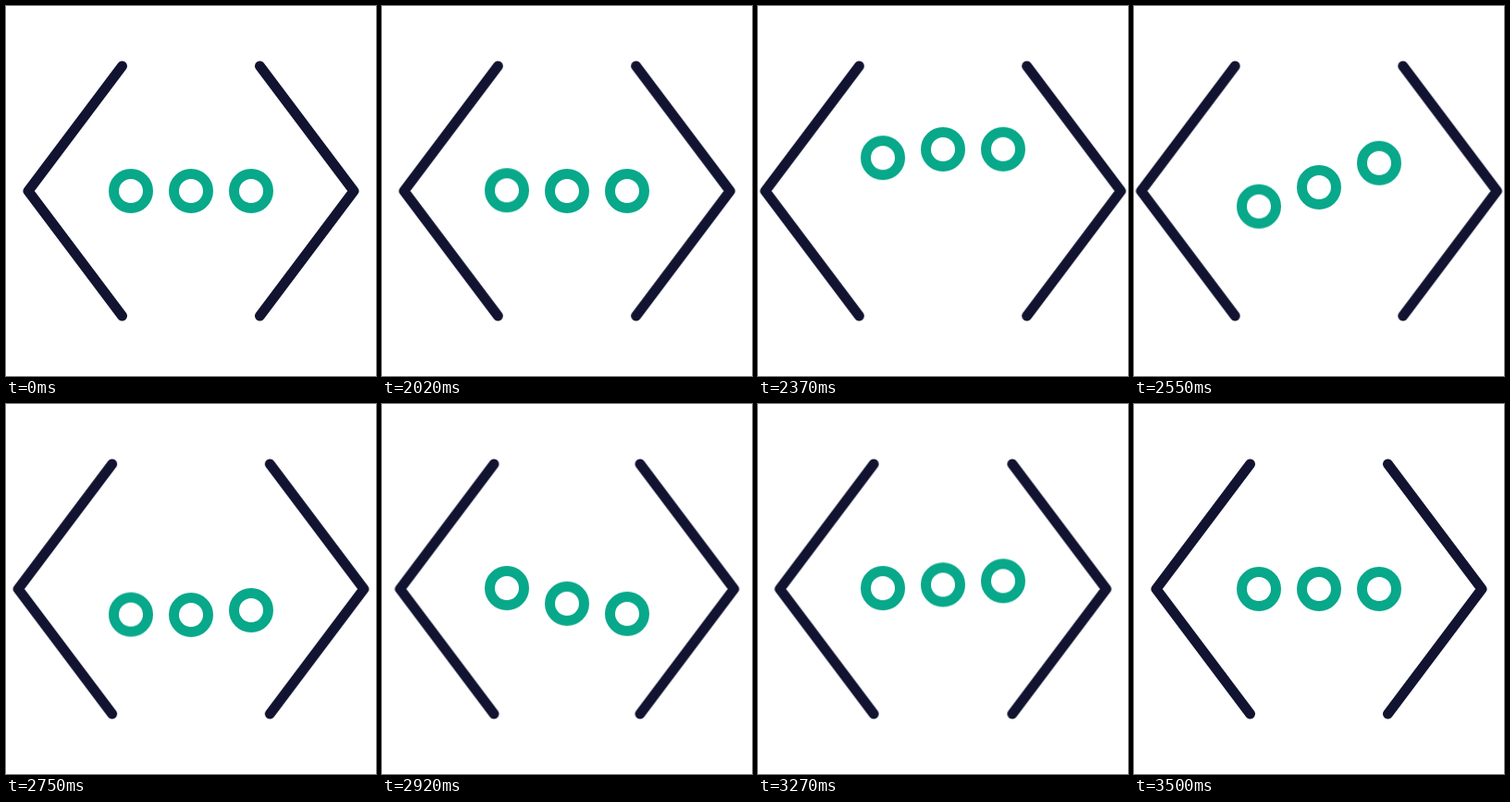
Animation of 400x400 px, one loop 3520 ms. Source, as an HTML page:

```html
<!DOCTYPE html>
<html lang="en">
<head>
<meta charset="utf-8">
<title>Code brackets</title>
<style>
  html, body { margin: 0; width: 100%; height: 100%; overflow: hidden; background: #fff; }
  svg { display: block; width: 100vw; height: 100vh; }
  g { fill: none; stroke-width: 11; stroke-linecap: round; stroke-linejoin: round; }
</style>
</head>
<body>
<svg viewBox="0 0 400 400">
  <g stroke="#121331">
    <path id="left" d="M125.5 65 24 200l101.5 135"/>
    <path id="right" d="M274.5 65 376 200 274.5 335"/>
  </g>
  <g stroke="#08a88a">
    <circle class="dot" cx="135" cy="200" r="18.5"/>
    <circle class="dot" cx="200" cy="200" r="18.5"/>
    <circle class="dot" cx="265" cy="200" r="18.5"/>
  </g>
</svg>
<script>
  const LOOP = 3520;
  const STAGGER = 78;

  // Steps: [time in ms, offset in px, easing towards the next step]
  const spread = [
    [2000, 0, 'cubic-bezier(.25,0,.3,1)'],
    [2460, 16.7, 'cubic-bezier(.4,0,.15,1)'],
    [3500, 0, 'linear']
  ];
  const bounce = [
    [2000, 0, 'cubic-bezier(.4,0,.39,1)'],
    [2250, -46.1, 'cubic-bezier(.49,0,.39,1)'],
    [2710, 28.4, 'cubic-bezier(.49,0,.39,1)'],
    [3061, -9.5, 'cubic-bezier(.4,0,.5,1)'],
    [3341, 0, 'linear']
  ];

  function play(el, steps, toTransform, delay = 0) {
    const rest = { transform: toTransform(0) };
    const frames = steps.map(([time, value, easing]) => ({
      offset: (time + delay) / LOOP,
      transform: toTransform(value),
      easing
    }));
    el.animate(
      [{ ...rest, offset: 0 }, ...frames, { ...rest, offset: 1 }],
      { duration: LOOP, iterations: Infinity }
    );
  }

  play(document.getElementById('left'), spread, v => `translate(${-v}px, 0px)`);
  play(document.getElementById('right'), spread, v => `translate(${v}px, 0px)`);
  document.querySelectorAll('.dot').forEach((dot, i) =>
    play(dot, bounce, v => `translate(0px, ${v}px)`, i * STAGGER));
</script>
</body>
</html>
```
